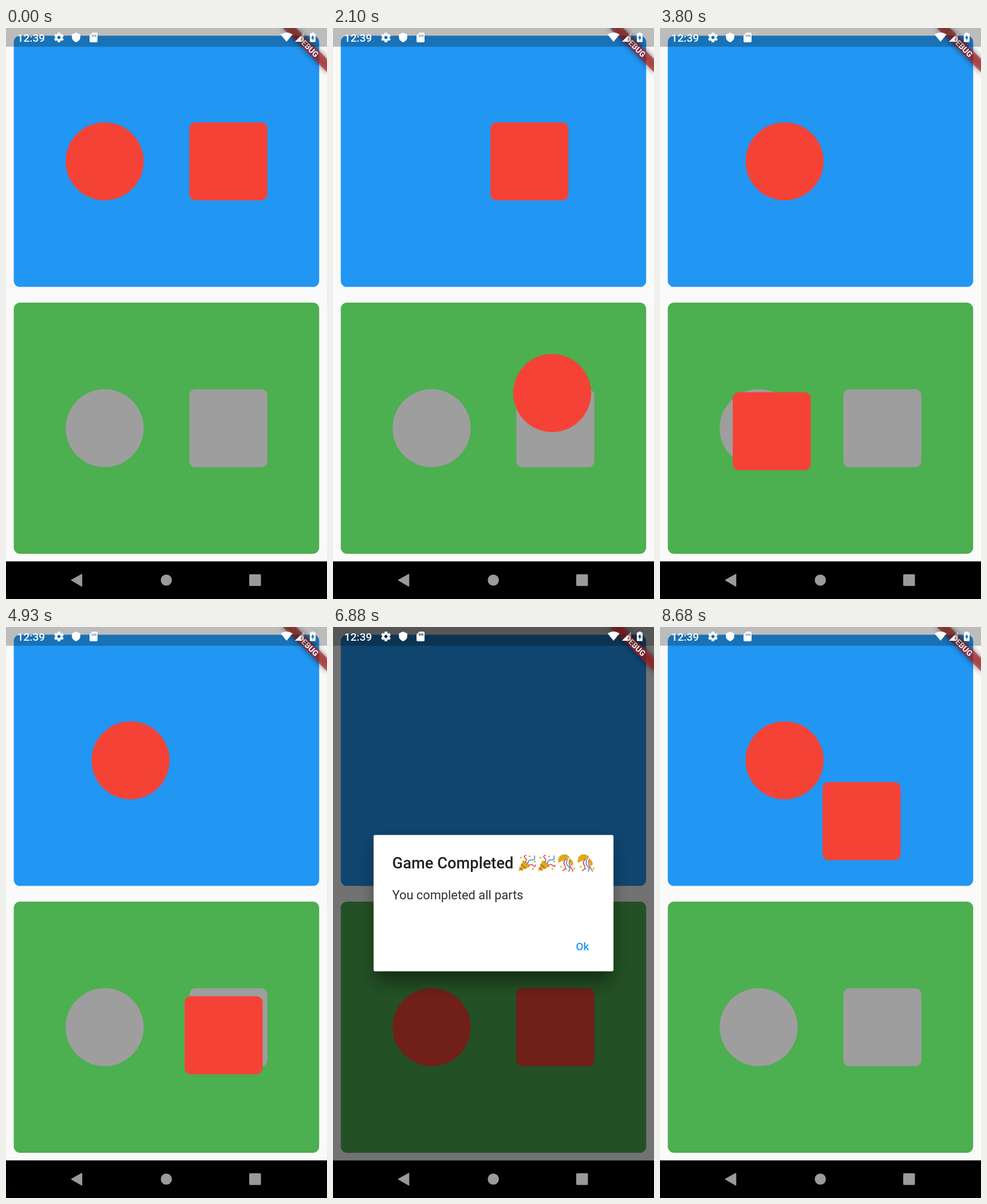
Recreate the animation shown at these times as an HTML page. Size 561 by 998 pixels, loop 9.56 s.

```html
<!DOCTYPE html>
<html lang="en">
<head>
<meta charset="utf-8">
<title>Shape matching game</title>
<style>
  html, body { margin: 0; width: 100%; height: 100%; overflow: hidden; background: #000; }
  svg { display: block; width: 100vw; height: 100vh; }
  text { font-family: Roboto, sans-serif; }
  .red { fill: #f44336; }
  .grey { fill: #9e9e9e; }
  .medium { font-weight: 500; }
</style>
</head>
<body>
<svg viewBox="0 0 561 998">
  <defs>
    <circle id="disc" r="68.2"/>
    <rect id="block" x="-68.2" y="-68.2" width="136.4" height="136.4" rx="10.9"/>
    <filter id="soft" x="-30%" y="-80%" width="160%" height="260%"><feGaussianBlur stdDeviation="4"/></filter>
    <filter id="cardShadow" x="-30%" y="-30%" width="160%" height="160%"><feGaussianBlur stdDeviation="14"/></filter>
    <g id="popper" fill="none" stroke-width="1.7" stroke-linecap="round">
      <path d="M1 29 L9 10 Q18 12 21 21 Z" fill="#e0a81c"/>
      <path d="M6 17 L14 24 M3 23 L8 27" stroke="#c46a1c"/>
      <path d="M13 13 Q17 9 13 6 T14 1 M19 19 Q24 15 27 19 T31 18" stroke="#e04545"/>
      <path d="M17 16 Q19 8 25 9 T29 2" stroke="#3b95dc"/>
      <path d="M20 3 h1 M5 5 h1 M26 25 h1 M29 12 h1" stroke="#e0a81c" stroke-width="2.5"/>
    </g>
    <g id="ball" fill="none" stroke-width="1.7" stroke-linecap="round">
      <path d="M2 14 A11 11 0 0 1 22 5 Z" fill="#e0a81c"/>
      <path d="M20 6 A11 11 0 0 1 28 17 L24 20 Z" fill="#e0a81c"/>
      <path d="M15 8 Q9 13 13 18 T10 28 M21 10 Q20 18 24 23 T27 29" stroke="#e04545"/>
      <path d="M18 8 Q14 16 19 20 T20 29" stroke="#3b95dc"/>
      <path d="M6 21 h1 M15 25 h1 M29 24 h1" stroke="#e0a81c" stroke-width="2.5"/>
    </g>
  </defs>

  <rect width="561" height="932.5" fill="#fafafa"/>
  <rect x="13.6" y="13.6" width="533.7" height="439" rx="10.9" fill="#2196f3"/>
  <rect x="13.6" y="480" width="533.7" height="439" rx="10.9" fill="#4caf50"/>
  <use id="discTarget" href="#disc" x="172.4" y="699.4"/>
  <use id="blockTarget" href="#block" x="388.6" y="699.4"/>
  <use id="discPiece" class="red" href="#disc"/>
  <use id="blockPiece" class="red" href="#block"/>

  <rect id="barrier" width="561" height="932.5"/>
  <g id="dialog">
    <rect x="74" y="380" width="413" height="240" opacity=".4" filter="url(#cardShadow)"/>
    <rect x="70.9" y="363.5" width="419.3" height="238.3" rx="2.7" fill="#fff"/>
    <text class="medium" x="103.6" y="422" font-size="27.3" fill-opacity=".87">Game Completed</text>
    <use href="#popper" x="323" y="398"/>
    <use href="#popper" x="357" y="398"/>
    <use href="#ball" x="392" y="398"/>
    <use href="#ball" x="426" y="398"/>
    <text x="103.6" y="476" font-size="21.8" fill-opacity=".82">You completed all parts</text>
    <rect id="press" x="392.5" y="534" width="87" height="49" rx="2.7" fill="#bcbcbc" fill-opacity=".25"/>
    <text class="medium" x="436" y="565" font-size="19.1" text-anchor="middle" fill="#2196f3">Ok</text>
  </g>

  <g transform="translate(561) rotate(45) scale(1.3636)">
    <rect x="-40" y="28" width="80" height="12" fill-opacity=".5" filter="url(#soft)"/>
    <rect x="-40" y="28" width="80" height="12" fill="#b71c1c" fill-opacity=".627"/>
    <text y="37.6" font-size="10.2" font-weight="700" text-anchor="middle" fill="#fff">DEBUG</text>
  </g>

  <rect width="561" height="32.7" fill-opacity=".25"/>
  <g fill="#fff">
    <text class="medium" x="19.5" y="23.6" font-size="19.2">12:39</text>
    <g fill="none" stroke="#fff" transform="translate(92.5 16.5) rotate(30)">
      <circle r="4.7" stroke-width="3.8"/>
      <circle r="7.2" stroke-width="2.8" stroke-dasharray="4.54 3" stroke-dashoffset="2.3"/>
    </g>
    <path d="M122.5 8 l7.3 3.2 v5 q0 6 -7.3 8.8 q-7.3 -2.8 -7.3 -8.8 v-5 Z"/>
    <path fill-rule="evenodd" d="M151 8 h7 q2 0 2 2 v13 q0 2 -2 2 h-10 q-2 0 -2 -2 v-10 Z M150 11 v4 h1.7 v-4 Z M153 11 v4 h1.7 v-4 Z M156 11 v4 h1.7 v-4 Z"/>
    <path d="M490.3 24 L479.8 11.3 Q490.3 4 500.8 11.3 Z"/>
    <path d="M505 24 L521 8 V24 Z" opacity=".4"/>
    <path d="M505 24 L515 14 V24 Z"/>
    <path fill-rule="evenodd" d="M534 9.5 V8 h4 v1.5 h2 q1 0 1 1 v13 q0 1 -1 1 h-8 q-1 0 -1 -1 v-13 q0 -1 1 -1 Z M537 11.5 L533 18 h2.4 v4.5 L539 15.8 h-2 Z"/>
  </g>

  <rect y="932.5" width="561" height="65.5"/>
  <g fill="#9a9a9a" stroke="#9a9a9a" stroke-width="1.5" stroke-linejoin="round">
    <path d="M114.5 965 L132.5 954.8 V975.5 Z"/>
    <circle cx="280.2" cy="965" r="9"/>
    <rect x="425.8" y="955.6" width="19" height="19" rx="1"/>
  </g>
</svg>

<script>
const LOOP = 9560;
const MIDDLE = 280.5, TOP_Y = 233.1;
const WIDE = 108.1, NARROW = 62.8; // offsets from the middle: both pieces on top, or one
const side = { disc: -1, block: 1 };
const other = { disc: 'block', block: 'disc' };

const OPEN = 6780, PRESS = 7890, RESET = 8060, CLOSED = 8152;

// A drag goes from the piece's place at `grab` through its stops to `drop`.
const drags = [
  { piece: 'disc', grab: 1520, drop: 3190, stops: [{ t: 2100, x: 383, y: 638 }, { t: 2270, x: 430.6, y: 698 }] },
  { piece: 'block', grab: 3320, drop: 4470, stops: [{ t: 3800, x: 195.3, y: 704.6 }] },
  { piece: 'block', grab: 4640, drop: 5830, fits: true, stops: [{ t: 4930, x: 380.3, y: 713.5 }, { t: 5200, x: 378, y: 756 }] },
  { piece: 'disc', grab: 6080, drop: 6810, fits: true, stops: [{ t: 6490, x: 190.3, y: 687.8 }, { t: 6620, x: 186.3, y: 697 }] },
  { piece: 'block', grab: 8520, drop: LOOP, stops: [{ t: 8680, x: 352.3, y: 339.2 }] }
];

const el = id => document.getElementById(id);
const clamp = v => Math.max(0, Math.min(1, v));
const smooth = k => k * k * (3 - 2 * k);

const isDragged = (piece, t) => drags.find(d => d.piece === piece && t >= d.grab && t < d.drop);
const isPlaced = (piece, t) => t < RESET && drags.some(d => d.piece === piece && d.fits && t >= d.drop);
const isAway = (piece, t) => isDragged(piece, t) || isPlaced(piece, t);

function restingPoint(piece, t) {
  const offset = isAway(other[piece], t) ? NARROW : WIDE;
  return { x: MIDDLE + side[piece] * offset, y: TOP_Y };
}

function dragPoint({ piece, grab, stops }, t) {
  let { x, y } = restingPoint(piece, grab);
  let from = grab;
  for (const stop of stops) {
    const k = smooth(clamp((t - from) / (stop.t - from)));
    x += (stop.x - x) * k;
    y += (stop.y - y) * k;
    from = stop.t;
  }
  return { x, y };
}

function draw(t) {
  for (const piece in side) {
    const drag = isDragged(piece, t);
    const placed = isPlaced(piece, t);
    const { x, y } = drag ? dragPoint(drag, t) : restingPoint(piece, t);
    const node = el(piece + 'Piece');
    node.setAttribute('transform', `translate(${x} ${y})`);
    node.style.display = placed ? 'none' : '';
    el(piece + 'Target').setAttribute('class', placed ? 'red' : 'grey');
  }
  const shown = clamp(Math.min((t - OPEN) / 100, (CLOSED - t) / 80));
  el('barrier').style.opacity = t < drags[3].drop ? 0 : 0.54 * shown ** 0.9;
  el('dialog').style.opacity = t < drags[3].drop ? 0 : shown;
  el('press').style.opacity = t >= PRESS ? 1 : 0;
}

const start = performance.now();
function tick() {
  draw((performance.now() - start) % LOOP);
  requestAnimationFrame(tick);
}
tick();
</script>
</body>
</html>
```
